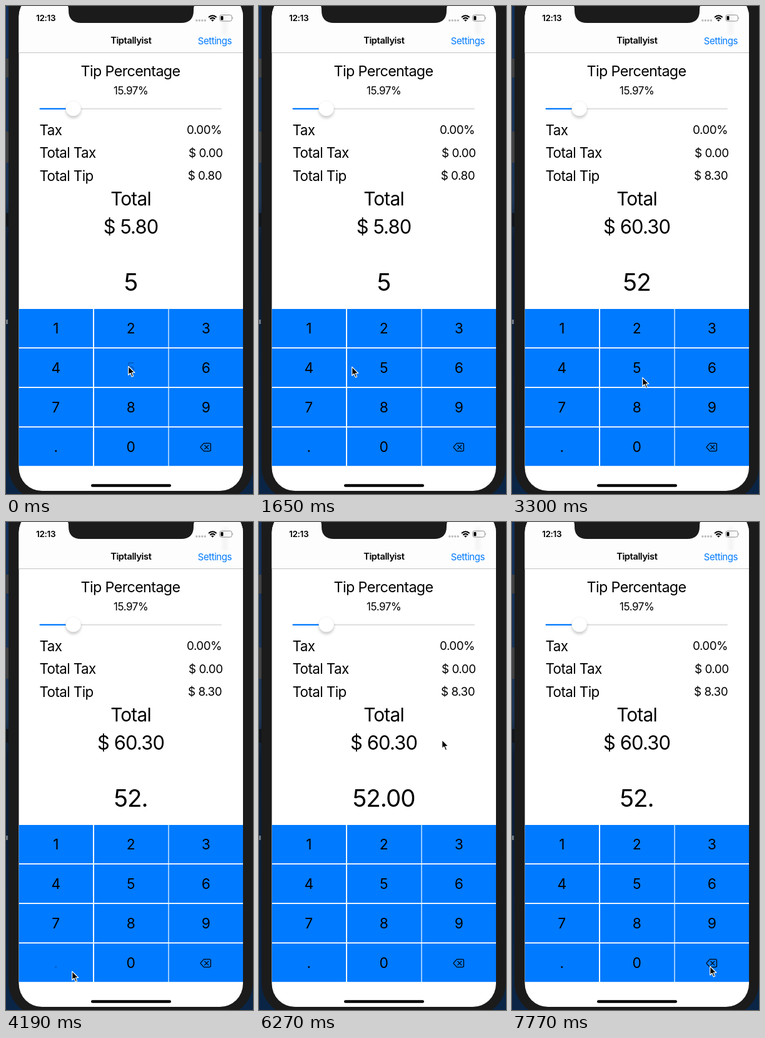
These frames come from a looping animation (395 px wide and 778 px high, 8 s). An HTML page:

```html
<!DOCTYPE html>
<html lang="en">
<head>
<meta charset="utf-8">
<title>Tip calculator</title>
<style>
  html, body { margin: 0; width: 100%; height: 100%; overflow: hidden; background: #1a1a1a; }
  svg { display: block; width: 395px; height: 778px; }
  text {
    font-family: Inter, Roboto, "Liberation Sans", sans-serif;
    font-optical-sizing: none;
    letter-spacing: -0.026em;
    white-space: pre;
  }
</style>
</head>
<body>
<svg id="stage" viewBox="0 0 395 778" xmlns="http://www.w3.org/2000/svg">
  <defs>
    <linearGradient id="wall" x1="0" y1="0" x2="0" y2="1">
      <stop offset="0" stop-color="#12305a"/>
      <stop offset=".4" stop-color="#1c3554"/>
      <stop offset=".48" stop-color="#0b1c33"/>
      <stop offset="1" stop-color="#0a2546"/>
    </linearGradient>
    <filter id="soft" x="-50%" y="-50%" width="200%" height="200%">
      <feGaussianBlur stdDeviation="2.2"/>
    </filter>
    <clipPath id="screen"><rect x="20.5" y="-20" width="358.5" height="793" rx="37"/></clipPath>
  </defs>

  <rect width="395" height="778" fill="url(#wall)"/>
  <path d="M0 84h5v30h-5zM0 200h5v50h-5z" fill="#414244"/>
  <path d="M0 330h5v22h-5z" fill="#10151d"/>
  <path d="M0 500h3v7h-3z" fill="#6d7681"/>
  <rect x="4" y="-60" width="391" height="848" rx="54" fill="#1b1b1b"/>

  <g clip-path="url(#screen)">
    <rect x="20" y="-20" width="360" height="800" fill="#fff"/>
    <rect x="20" y="-20" width="360" height="94" fill="#fdfdfd"/>
    <rect x="346" y="8" width="8" height="38" rx="4" fill="#eee" opacity=".6" filter="url(#soft)"/>
    <path d="M20 74.5h360" stroke="#c4c4c6"/>
    <path d="M97 -2Q100 -1 100 6V7Q100 27 120 27H280Q300 27 300 7V6Q300 -1 303 -2Z" fill="#1b1b1b"/>
    <g id="labels"></g>

    <g fill="#b9b9bb">
      <circle cx="304.8" cy="23" r="1.7"/><circle cx="309.3" cy="23" r="1.7"/>
      <circle cx="313.8" cy="23" r="1.7"/><circle cx="318.3" cy="23" r="1.7"/>
    </g>
    <g fill="none" stroke="#000" stroke-width="2">
      <path d="M324 18.1Q330.3 12.4 336.6 18.1M326.3 20.7Q330.3 17.1 334.3 20.7"/>
    </g>
    <path d="M328.1 22.4Q330.3 20.7 332.5 22.4L330.3 24.7Z"/>
    <rect x="341.8" y="14.3" width="19.4" height="9.8" rx="2.8" fill="none" stroke="#8e8e8e"/>
    <rect x="343.4" y="15.9" width="4" height="6.6" rx="1.2"/>
    <path d="M362.4 17.4q1.7 1.8 0 3.6z" fill="#8e8e8e"/>

    <rect x="53.5" y="162.7" width="291.5" height="2.2" rx="1.1" fill="#e1e1e2"/>
    <rect x="53.5" y="162.7" width="54" height="2.2" rx="1.1" fill="#007aff"/>
    <circle cx="107.7" cy="166.5" r="12.3" opacity=".2" filter="url(#soft)"/>
    <circle cx="107.7" cy="163.4" r="12.2" fill="#fff" stroke="#000" stroke-opacity=".07" stroke-width=".6"/>

    <g id="keys"></g>
    <path d="M316.4 697.2H325.4Q327.4 697.2 327.4 699.2V707.6Q327.4 709.6 325.4 709.6H316.4L311.4 704.1Q310.9 703.4 311.4 702.7ZM317.7 700.4L323.7 706.4M323.7 700.4L317.7 706.4"
          fill="none" stroke="#000" stroke-width="1.25" stroke-linecap="round" stroke-linejoin="round"/>
    <rect x="136" y="762.3" width="128" height="4.4" rx="2.2"/>
  </g>

  <path id="cursor" d="M.7 1.4V15.3L3.9 12.3L6.2 18L8.6 17L6.3 11.5H10.8Z"
        stroke="#fff" stroke-width="1.2" stroke-linejoin="round"/>
</svg>

<script>
const LOOP = 8000;
const BLUE = '#007aff';
const $ = id => document.getElementById(id);

function add(parent, tag, attrs, content = '') {
  const node = document.createElementNS('http://www.w3.org/2000/svg', tag);
  for (const name in attrs) node.setAttribute(name, attrs[name]);
  node.textContent = content;
  parent.appendChild(node);
  return node;
}

function label(content, x, y, size, anchor = 'middle', extra = {}) {
  return add($('labels'), 'text',
    { x, y, 'font-size': size, 'text-anchor': anchor, ...extra }, content);
}

label('12:13', 48, 24.3, 13.6, 'start', { 'font-weight': 600 });
label('Tiptallyist', 199.8, 60.3, 14.6, 'middle', { 'font-weight': 600 });
label('Settings', 361, 60.5, 14.9, 'end', { fill: BLUE });
label('Tip Percentage', 199, 112, 23.3);
label('15.97%', 199.7, 140.5, 17);
label('Tax', 53.5, 206, 22.4, 'start');
label('0.00%', 345, 204.3, 18.8, 'end');
label('Total Tax', 53.5, 242.2, 22.4, 'start');
label('$ 0.00', 346.5, 240.6, 18.8, 'end');
label('Total Tip', 53.5, 278.5, 22.4, 'start');
label('Total', 199.5, 317.5, 29.8);
const tip = label('', 345, 276.8, 18.8, 'end');
const total = label('', 199.5, 363, 30.8);
const amount = label('', 199.5, 454, 38.5);

// Keypad
const columns = [[20.5, 139], [141, 259.4], [260.6, 379]];
const keys = {};
[...'123456789.0 '].forEach((name, i) => {
  const [left, right] = columns[i % 3];
  const top = 483 + 63 * Math.floor(i / 3);
  add($('keys'), 'rect', { x: left, y: top, width: right - left, height: 61.2, fill: BLUE });
  keys[name] = add($('keys'), 'text', {
    x: 79.5 + 120 * (i % 3), y: top + 39.3, 'font-size': 22.8, 'text-anchor': 'middle'
  }, name);
});

// [time, pointer x, pointer y]
const path = [
  [0, 195, 573], [150, 195, 571], [750, 194.5, 519], [900, 194.5, 519],
  [1650, 148, 574], [1950, 151, 584], [2100, 157, 596], [2400, 188, 622],
  [2550, 203, 585], [2700, 207, 539], [2850, 207, 525], [3000, 206, 520],
  [3150, 206, 530], [3590, 211, 710], [3740, 211, 710], [4040, 112, 715],
  [4190, 105, 715], [4340, 116, 713], [4640, 205, 697], [4940, 208, 696],
  [5090, 212, 689], [5230, 222, 667], [5820, 284, 640], [5970, 289, 635],
  [6120, 301, 480], [6270, 292, 346], [6420, 292, 346], [6720, 274, 232],
  [6870, 268, 199], [7020, 274, 258], [7320, 312, 650], [7470, 316, 707],
  [LOOP, 316, 707]
];

// [time, shown amount, bill]
const entries = [
  [0, '5', 5], [3000, '52', 52], [4190, '52.', 52], [4640, '52.0', 52],
  [4940, '52.00', 52], [7620, '52.0', 52], [7770, '52.', 52]
];

// [key, from, to]
const presses = [['5', 0, 150], ['2', 3000, 3150], ['.', 4190, 4340], ['0', 4640, 4790]];

// The screen refreshes about every 150 ms, with three shorter ticks.
const ticks = Array.from({ length: 53 }, (_, k) =>
  150 * k - 10 * [24, 35, 39].filter(n => k >= n).length);

const latest = (list, t, time = item => item) => list.filter(item => time(item) <= t).pop();

function pointerAt(t) {
  const i = Math.max(1, path.findIndex(point => point[0] > t));
  const [t0, x0, y0] = path[i - 1], [t1, x1, y1] = path[i];
  const u = (t - t0) / (t1 - t0);
  return [x0 + (x1 - x0) * u, y0 + (y1 - y0) * u];
}

function draw(time) {
  const t = latest(ticks, time);
  const [, shown, bill] = latest(entries, t, entry => entry[0]);
  const tipValue = bill * 0.1597;
  tip.textContent = '$ ' + tipValue.toFixed(2);
  total.textContent = '$ ' + (bill + tipValue).toFixed(2);
  amount.textContent = shown;
  for (const [key, from, to] of presses)
    keys[key].setAttribute('opacity', t >= from && t < to ? 0.22 : 1);
  $('cursor').setAttribute('transform', `translate(${pointerAt(t).map(Math.round)})`);
}

const start = performance.now();
function frame() {
  draw((performance.now() - start) % LOOP);
  requestAnimationFrame(frame);
}
frame();
</script>
</body>
</html>
```
